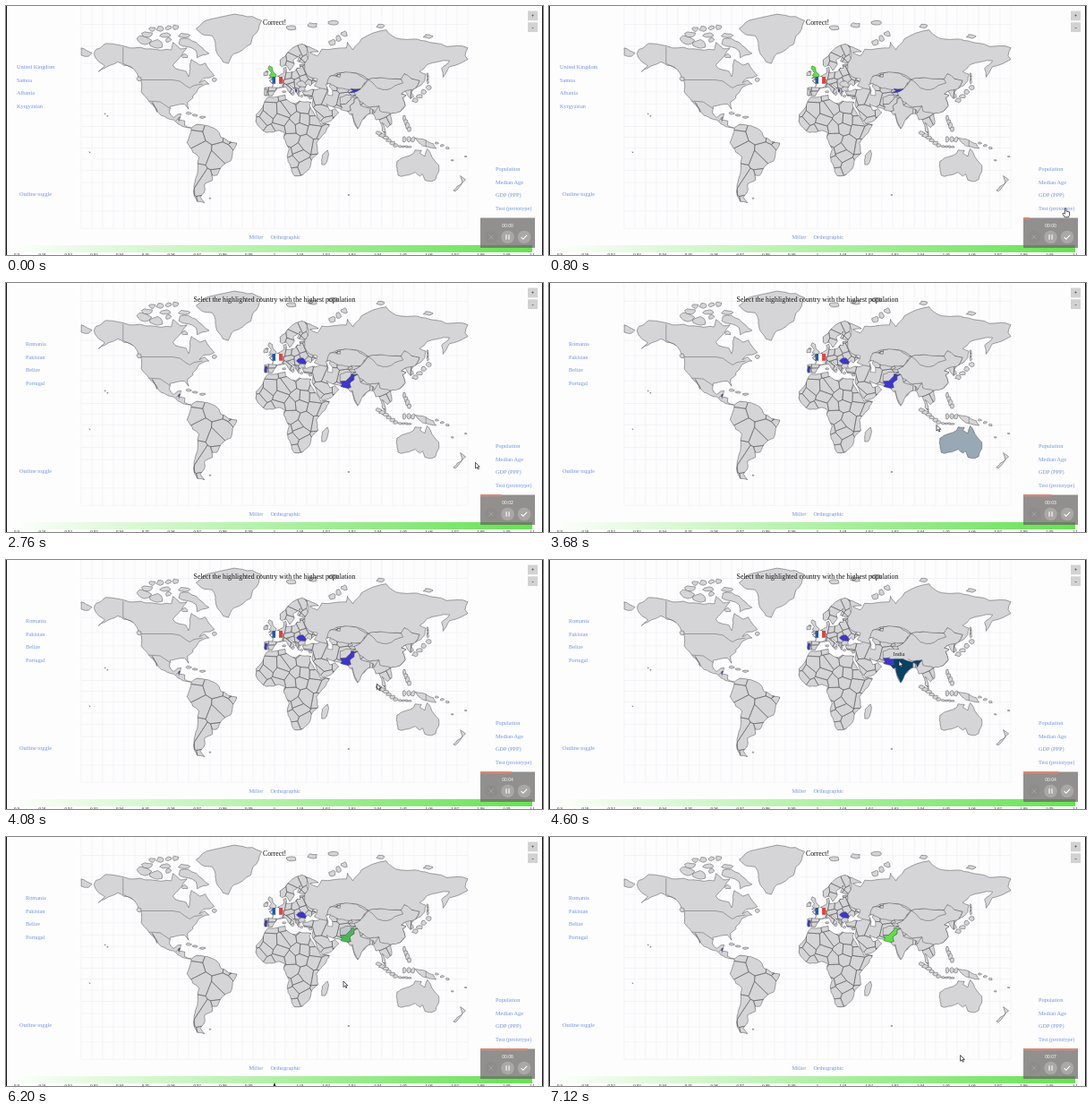
An HTML page for the animation above (7160 ms loop, 600 px wide and 278 px high).

```html
<!DOCTYPE html>
<html lang="en">
<head>
<meta charset="utf-8">
<title>Map quiz</title>
<style>
  html, body { margin: 0; width: 100%; height: 100%; overflow: hidden; background: #fefdfe; }
  svg { display: block; width: 100%; height: 100%; }
  text { font-family: "Liberation Serif", "Times New Roman", serif; font-size: 6.3px; }
  .link { fill: #6f93e0; }
  .mid { text-anchor: middle; }
  .title { font-size: 7.8px; fill: #111; }
  .tick { font-size: 4.8px; fill: #222; }
  .clock { font: 5px "Liberation Sans", sans-serif; fill: #fff; }
  .land { fill: #d5d4d6; stroke: #4c4c4e; stroke-width: .5; stroke-linejoin: round; }
  .sea { fill: #fefdfe; stroke: #4c4c4e; stroke-width: .45; }
  .border { fill: none; stroke: #4c4c4e; stroke-width: .45; }
  .grid { stroke: #ececf0; stroke-width: .6; fill: none; }
</style>
</head>
<body>
<svg id="stage" viewBox="0 0 600 278">
  <defs id="defs">
    <linearGradient id="scale"><stop stop-color="#fbfffa"/><stop offset="1" stop-color="#66e252"/></linearGradient>
  </defs>
  <rect width="600" height="278" fill="#fefdfe"/>
  <g id="map"></g>
  <path d="M.5 0V278M599.5 0V278" stroke="#111"/>
  <rect x="12" y="267" width="576" height="8" fill="url(#scale)"/>
  <g id="ui"></g>
  <path id="marker" d="M-7 4L-4 2L0-1L4 2L7 4z" fill="#111"/>
  <g id="recorder">
    <rect x="530" y="236.5" width="61" height="33.5" fill="#656261" opacity=".7"/>
    <rect id="progress" x="530" y="236" height="2.2" fill="#d98a76"/>
    <text id="clock" class="clock mid" x="560.5" y="247"/>
    <circle cx="542" cy="258" r="7" fill="#8e8c8b"/>
    <circle cx="560.5" cy="258" r="7.3" fill="#aaa8a7"/>
    <circle cx="579" cy="258" r="7.3" fill="#aaa8a7"/>
    <path d="M539.5 255.5l5 5m0-5l-5 5" stroke="#a9a7a6" stroke-width=".8"/>
    <path d="M559 255.3v5.4m3-5.4v5.4m13.6-2.6l2.2 2.2l4.2-4.4" fill="none" stroke="#fff" stroke-width="1.1"/>
  </g>
  <g id="tip"><rect id="tipBox" height="10.5"/><text id="tipText" class="mid" y="7.4"/></g>
  <g id="cursor">
    <path id="arrow" d="M0 0V6.6L1.6 5.2L2.8 7.6L3.8 7.1L2.7 4.8H4.8z" fill="#fff" stroke="#111" stroke-width=".7"/>
    <path id="hand" d="M-.6 0Q.3-.8 1 0V3.2L4.6 4V7.5L3.6 9.8H-.8L-3 6.2Q-3 4.8-1.7 5.4L-.6 6z" fill="#fff" stroke="#111" stroke-width=".7"/>
  </g>
</svg>
<script>
const LOOP = 7160, ASK = 1920, ANSWER = 5900, FADE = 400;
const GREY = [213, 212, 214], BLUE = [58, 53, 212], GREEN = [92, 226, 70], TEAL = [7, 66, 104];
const $ = id => document.getElementById(id);
const clamp = v => Math.max(0, Math.min(1, v));
const rgb = c => `rgb(${c.map(Math.round)})`;
const mix = (a, b, k) => a.map((v, i) => v + (b[i] - v) * k);
const range = n => [...Array(n).keys()];

let seed = 7;
function random() {
  seed = (seed * 16807) % 2147483647;
  return seed / 2147483647;
}
const jitter = size => (random() - 0.5) * size;

function add(parent, tag, attrs, text = '') {
  const node = document.createElementNS('http://www.w3.org/2000/svg', tag);
  for (const key in attrs) node.setAttribute(key, attrs[key]);
  node.textContent = text;
  return $(parent).appendChild(node);
}

// Miller projection
const project = ([lon, lat]) =>
  [300 + 1.2 * lon, 146.5 - 68.75 * 1.25 * Math.log(Math.tan(Math.PI / 4 + 0.4 * lat * Math.PI / 180))];
const parse = s => s.split(' ').map(p => project(p.split(',').map(Number)));
const line = pts => 'M' + pts.map(p => p.map(v => v.toFixed(1)).join(' ')).join('L');

// Breaks long edges at displaced midpoints so that coasts look natural
function roughen(pts, passes = 2) {
  if (!passes) return pts;
  const out = pts.flatMap((p, i) => {
    const q = pts[(i + 1) % pts.length], dx = q[0] - p[0], dy = q[1] - p[1];
    if (Math.hypot(dx, dy) < 5) return [p];
    const k = jitter(0.18);
    return [p, [(p[0] + q[0]) / 2 - dy * k, (p[1] + q[1]) / 2 + dx * k]];
  });
  return roughen(out, passes - 1);
}

// Part of a polygon that lies nearer to a than to b
function nearer(poly, a, b) {
  const side = p => Math.hypot(p[0] - b[0], p[1] - b[1]) ** 2 - Math.hypot(p[0] - a[0], p[1] - a[1]) ** 2;
  return poly.flatMap((p, i) => {
    const q = poly[(i + 1) % poly.length], s = side(p), r = side(q);
    const cut = s * r < 0 ? [mix(p, q, s / (s - r))] : [];
    return s >= 0 ? [p, ...cut] : cut;
  });
}

// Country borders as Voronoi cells around a jittered grid
function divide(name, pts, d, step) {
  const xs = pts.map(p => p[0]), ys = pts.map(p => p[1]);
  const x0 = Math.min(...xs), x1 = Math.max(...xs), y0 = Math.min(...ys), y1 = Math.max(...ys);
  const sites = [];
  for (let y = y0; y < y1 + step; y += step)
    for (let x = x0; x < x1 + step; x += step) sites.push([x + jitter(step), y + jitter(step)]);
  add('defs', 'clipPath', { id: 'in-' + name }).appendChild(document.createElementNS('http://www.w3.org/2000/svg', 'path')).setAttribute('d', d);
  const box = [[x0, y0], [x1, y0], [x1, y1], [x0, y1]];
  const cells = sites.map(a => sites.reduce((poly, b) => a === b ? poly : nearer(poly, a, b), box)).filter(c => c.length);
  add('map', 'path', { class: 'border', 'clip-path': `url(#in-${name})`, d: cells.map(c => line(c) + 'z').join('') });
}

const shapes = {};
function land(name, coords, step, cls = 'land') {
  const pts = roughen(parse(coords)), d = line(pts) + 'z';
  shapes[name] = add('map', 'path', { class: cls, d });
  if (step) divide(name, pts, d, step);
}
const border = coords => add('map', 'path', { class: 'border', d: line(parse(coords)) });

// A chain of irregular islands between two places, sizes in pixels
function isles(count, from, to, w, h) {
  for (const i of range(count)) {
    const [x, y] = project(mix(from, to, count > 1 ? i / (count - 1) : 0));
    const pts = range(9).map(j => {
      const a = j / 9 * 2 * Math.PI, r = 0.5 + jitter(0.3);
      return [x + Math.cos(a) * w * r, y + Math.sin(a) * h * r];
    });
    add('map', 'path', { class: 'land', d: line(pts) + 'z' });
  }
}

add('map', 'path', { class: 'grid', d: range(37).map(i => `M${84 + 12 * i} 0V248`).join('') +
  range(16).map(i => `M84 ${project([0, 80 - 10 * i])[1].toFixed(1)}H516`).join('') });

land('northAmerica', '-168,65.6 -166,68.3 -157,71.3 -135,69 -115,68.5 -96,68 -94.5,71.8 -88,68.5 -81.5,69 -87,64.5 -94.7,59 -92.5,57 -82.3,55 -80,51.3 -79,54.5 -77.5,62.5 -69.5,59 -64.5,60.3 -56,52 -66,50.2 -70,47 -65,49 -61,46 -70,43.5 -76,37 -76,35 -81,31.5 -80,25.5 -84,30 -97,28 -97.8,22.5 -94,18.2 -90.3,21 -87,21.5 -88.8,15.9 -83.4,15 -83.8,11 -77.3,8.6 -85.7,10 -94,16 -105.5,20 -114,31.5 -109.5,23 -117,32.5 -124,40 -124,48 -134,58 -146,61 -151.5,59.2 -164,54.7 -158,58.5 -165,62');
border('-124,49 -95,49 -88,48 -83,45 -79,43 -75,45 -67,46');
border('-117,32.5 -106.5,31.8 -97,26');
border('-141,69.5 -141,60 -132,57');
border('-92,15 -89,18 -89,14');
land('greenland', '-73,78.2 -60,82 -30,83.5 -12,81.5 -20,75 -22,71 -38,65.7 -43,60 -48,61 -53.5,66 -55,71.5 -58,75 -68,76');
land('baffin', '-61,66 -72,63.5 -73,67.5 -89,71 -88,73.5 -80,73.7 -67,69');
isles(2, [-122, 73], [-110, 71], 14, 9);
isles(3, [-118, 75.7], [-84, 75.2], 12, 5);
isles(4, [-114, 78], [-92, 78.7], 7, 5);
isles(1, [-79, 80.5], [], 26, 17);
isles(2, [-99, 73], [-84, 64.6], 7, 5);
isles(2, [-126, 49.7], [-56, 49], 5, 4);
isles(3, [-80, 22], [-67, 18.4], 6, 2);
isles(2, [-157.8, 21.4], [-155.5, 19.6], 1.2, 1);

land('southAmerica', '-77.3,8.6 -72,12 -62,10.6 -51.5,4.2 -50,0 -35.2,-5.5 -39,-13 -41,-22 -48.5,-26 -53.5,-34 -58.4,-34 -58,-38.3 -65,-41 -66,-48 -69,-51 -65.2,-54.7 -72,-53.8 -75.5,-46.8 -73.6,-37.2 -70.3,-18.3 -76,-14 -81.3,-5 -79,1.5', 23);
land('africa', '-6,35.8 10,37.3 10.2,34.3 19.5,30.4 23,32.6 34.2,31.2 32.6,29.9 37.2,21 43.2,12 51.2,11.8 47,4 39,-5.5 40.6,-15 35,-19.8 32.5,-28.5 25.7,-34 18.5,-34.5 15,-26.5 11.8,-17.5 13.7,-11 8.8,-1 9.6,4 4.3,6.3 -7.5,4.4 -13,8.5 -17.4,14.7 -17,21 -10,30', 13.5);
land('madagascar', '49.3,-12 50.4,-15.5 47,-25 44,-25 44.5,-16.5');
isles(2, [69, -49.3], [-60, -51.7], 2, 1);

land('asia', '26.2,40 35,42 41,42 48,49 60,55 77,55 90,52 121,54 134,46 127.5,39.5 129.4,36 126.5,34.5 121.5,40.5 118,38.3 122.4,37 119.3,35 121.7,28.5 117,23.5 108,21.6 109,12 105,9 100,13.5 103.4,2 100.3,6 97.5,16.5 94.3,16 92,21.5 87,21 80,15 77.5,8 72.8,19 66.5,25.2 57,26.8 48.5,30 51.5,24.2 56.3,26 59.8,22.5 55,17.5 45,12.7 39,21.5 34.9,29.5 36,36 27.5,36.8', 15);
land('europe', '-9.3,43 -1.8,43.4 -1.2,46 -4.7,48.4 1.6,50.9 8.7,53.9 8.2,57 10.6,57.6 11,54 18.5,54.7 21.2,57.2 24,57 23.5,59.2 29,59.5 33,52 39,48 35,46.3 33.5,44.5 31,46.2 28,42 29,41.2 23.5,40.2 22.5,36.5 19.4,41.5 13.7,45.5 12.3,45.2 18.4,40 16,38 10.3,43.8 3.2,43 -2,36.7 -9,37', 8.5);
land('nordics', '5.2,59 5,62 14,67.5 25.7,71 30.5,69.8 30,65 31.3,62.7 28,60.4 21.3,61.5 24,65.5 17.3,62 18.5,59.5 14.2,55.5 11,59 7,58', 12);
land('russia', '30,69.8 41,67 33,66.5 40,64.6 44,68.3 67,69 68,72 73,68 81,73.6 104,77.7 113,74 127,73.4 140,72.6 160,69.7 180,69 177.5,64.6 180,62.5 163,58 157,51 155.6,56.8 163,61.7 142,59.2 135.2,54.8 141,53 140,48.4 131,42.6 135,48.4 127.5,49.8 121,53.3 117.8,49.5 98,50.5 87.3,49.1 77,53.5 61.5,54 51.5,51.6 49,46.3 48.5,41.8 37,44.8 40,49.6 31,52 28,56 28,59.5 31,62.7');
land('chukotka', '-180,69 -170,66.2 -173,64.3 -180,65');
land('kazakhstan', '49,46.5 51.5,51.6 61,51 61.5,54 71,54.2 77,53.5 87.3,49.1 80,42.2 66,42 55,45');
land('china', '74,39.5 79,32.5 86,28 97.3,28.2 98,24 108,21.6 113,22 117,23.5 121.7,28.5 119.3,35 122.4,37 118,38.3 121.5,40.5 131,42.6 135,48.4 127.5,49.8 121,53.3 117.8,49.5 98,48 87.3,49.1 80,42.2');
land('mongolia', '87.3,49.1 98,50.5 107,49.8 117.8,49.5 119.7,46.7 105,41.7 96,42.8');
land('caspian', '47.5,45.5 52,46.5 51,44 54,41 54,37 49.5,37.5 50,40.5', 0, 'sea');
isles(1, [-19, 65], [], 12, 6);
isles(3, [16, 78.7], [55, 80.6], 10, 5);
isles(3, [54, 71.8], [65, 76], 7, 6);
isles(2, [99, 79.3], [143, 74.8], 9, 4);
isles(4, [131, 33], [143, 43.3], 6, 4.5);
isles(3, [142.6, 52.5], [142.7, 47.5], 2, 5);
isles(4, [9, 40], [33.4, 35], 3.5, 2.5);
isles(4, [121, 17], [125, 7.5], 4, 6);
isles(6, [97, 4], [113, -7.6], 6, 4);
isles(1, [114, 1], [], 11, 13);
isles(3, [121, -2], [129, -2.5], 4.5, 6);
isles(4, [117, -8.5], [126, -9], 4, 2);
isles(1, [80.7, 7.6], [], 2.5, 4);
isles(3, [151, -5.5], [161, -10], 4, 2);
isles(2, [165.5, -21.2], [178, -17.8], 2.5, 1.5);
isles(1, [146.6, -42], [], 4, 4);
land('newGuinea', '131,-.8 138,-1.7 147.8,-6 150.5,-10.5 143,-9 138,-8');
border('141,-2.5 141,-9');
land('newZealand', '173,-34.5 178,-37.7 173.5,-42 168.5,-46.6 166.5,-46 175,-40');
land('ireland', '-10,52 -9.8,54 -7.5,55.2 -6.1,53.8 -6.4,52.2');

land('uk', '-5.5,50.1 -3,51.4 -5,52 -3,54 -6,57 -5,58.6 -2,57.5 -1.5,55 1.7,52.6 1.3,51.2');
land('ulster', '-8,54.3 -7,55.2 -5.6,54.6');
land('france', '-1.8,43.4 -1.2,46 -4.7,48.4 1.6,50.9 8,49 7,44 3.2,43');
land('portugal', '-8.8,42 -6.3,41.8 -7.2,37.2 -9,37 -9.5,38.8');
land('albania', '19.4,42.4 20.5,42 21,40.6 20,39.6 19.3,40.6');
land('romania', '20.3,46.2 22.8,47.9 26.5,48.2 29.6,45.2 28.6,43.7 22.6,44.3');
land('belize', '-89.2,18.2 -87.8,18.4 -88.8,15.9 -89.3,16');
land('kyrgyzstan', '69.3,39.5 74,39.5 80,42.2 71,42.5 73,40.6');
land('afghanistan', '61,35.5 66.5,37.4 75,37.3 71,34 66.5,30 61,29.6');
land('india', '68.2,23.7 71,24.5 70,28 74,31 74,34 77.5,35.5 80.2,28.7 88,26.5 97.3,28.2 93,22 92,25 89,26 88.8,22 82.3,16.7 80,12 77.5,8 74.5,14 72.7,21.5 70.5,20.8');
land('pakistan', '61.6,25.2 63,27.3 61,29.6 66.5,30 71,34 71.3,36 77.5,35.5 74,34 74,31 70,28 71,24.5 68.2,23.7');
land('australia', '114,-22 122,-18 129.5,-15 131,-11.8 136.8,-12.2 135.5,-15 140,-17.6 142.2,-10.8 145.3,-15 153,-25.5 153,-31 150,-37.5 146.5,-39 140,-38 137.8,-33 135.5,-34.7 131,-31.5 118,-35 115,-34 113.5,-26');
land('samoa', '-172.7,-13.5 -171.5,-14 -172,-14.2');

shapes.france.style.fill = '#fff';
['#2059ad', '#fff', '#ec3b35'].forEach((fill, i) => add('map', 'rect', { x: 297.5 + 3.8 * i, y: 79, width: 3.8, height: 7.8, fill }));

const text = (x, y, s, cls) => add('ui', 'text', { x, y, class: cls }, s);
const title = text(300, 21, '', 'title mid');
const choices = range(4).map(i => text(0, 69.8 + 14.7 * i, '', 'link'));
text(33, 212, 'Outline toggle', 'link mid');
['Population', 'Median Age', 'GDP (PPP)', 'Test (prototype)'].forEach((s, i) => text(547, 183.8 + 14.7 * i, s, 'link'));
text(271.5, 260, 'Miller', 'link');
text(295.5, 260, 'Orthographic', 'link');
range(21).forEach(i => text(12 + 28.8 * i, 279, String(+(0.9 + i / 100).toFixed(2)), 'tick mid'));
['+', '-'].forEach((s, i) => {
  add('ui', 'rect', { x: 583, y: 5.5 + 12.8 * i, width: 11, height: 10.8, fill: '#d3d2d3' });
  text(588.5, 13 + 12.8 * i, s, 'mid');
});

const rounds = [
  { x: 12, names: ['United Kingdom', 'Samoa', 'Albania', 'Kyrgyzstan'], fills: { uk: GREEN, ulster: GREEN, samoa: BLUE, albania: BLUE, kyrgyzstan: BLUE } },
  { x: 22, names: ['Romania', 'Pakistan', 'Belize', 'Portugal'], fills: { romania: BLUE, pakistan: BLUE, belize: BLUE, portugal: BLUE } }
];
const hovers = {
  australia: [2900, 3400], india: [4200, 4950], pakistan: [4950, 5900], afghanistan: [5930, 6010]
};
const active = new Set([...rounds.flatMap(r => Object.keys(r.fills)), ...Object.keys(hovers)]);
// time, x, y where the pointer turns or rests
const route = [
  [0, 606, 234], [350, 604, 234], [720, 577, 226], [1760, 574, 223], [2150, 574, 223],
  [3680, 433, 158.5], [4550, 391, 112.5], [4750, 391, 112.5], [5250, 385, 107.3],
  [5900, 385, 107.3], [6200, 377, 161], [LOOP, 460, 244]
];

function cursorAt(t) {
  const i = route.findIndex(k => k[0] > t), [t0, ...from] = route[i - 1], [t1, ...to] = route[i];
  const k = (t - t0) / (t1 - t0);
  return mix(from, to, k * k * (3 - 2 * k));
}

function draw(t) {
  const round = rounds[+(t >= ASK)], [x, y] = cursorAt(t);
  const baseFill = name => name === 'pakistan' && t >= ANSWER ? GREEN : round.fills[name] || GREY;

  title.textContent = t < ASK || t >= ANSWER ? 'Correct!' : 'Select the highlighted country with the highest population';
  choices.forEach((c, i) => {
    c.textContent = round.names[i];
    c.setAttribute('x', round.x);
  });
  for (const name of active) {
    const [from, to] = hovers[name] || [LOOP, LOOP];
    const glow = clamp((Math.min(t, to) - from) / FADE) * clamp(1 - (t - to) / FADE);
    shapes[name].style.fill = rgb(mix(baseFill(name), TEAL, glow));
  }

  const over = Object.keys(hovers).find(name => t >= hovers[name][0] && t < hovers[name][1]);
  $('tip').style.display = over ? '' : 'none';
  if (over) {
    const fill = baseFill(over), label = $('tipText');
    label.textContent = over[0].toUpperCase() + over.slice(1);
    label.style.fill = fill === BLUE ? '#fff' : '#222';
    const w = label.getComputedTextLength() + 8;
    $('tipBox').setAttribute('x', -w / 2);
    $('tipBox').setAttribute('width', w);
    $('tipBox').style.fill = rgb(fill);
    $('tip').setAttribute('transform', `translate(${x} ${y - 12.7})`);
  }

  const size = clamp((t - 4950) / 300) * clamp(1 - (t - ANSWER) / FADE);
  $('marker').setAttribute('transform', `translate(300 275) scale(${size} 1)`);
  $('progress').setAttribute('width', 61 * t / LOOP);
  $('clock').textContent = '00:0' + Math.floor(t / 1000);

  const onLink = x < 588 && y > 221 && t < 2250;
  $('cursor').setAttribute('transform', `translate(${x} ${y})`);
  $('hand').style.display = onLink ? '' : 'none';
  $('arrow').style.display = onLink ? 'none' : '';
}

const start = performance.now();
function tick() {
  draw((performance.now() - start) % LOOP);
  requestAnimationFrame(tick);
}
tick();
</script>
</body>
</html>
```
